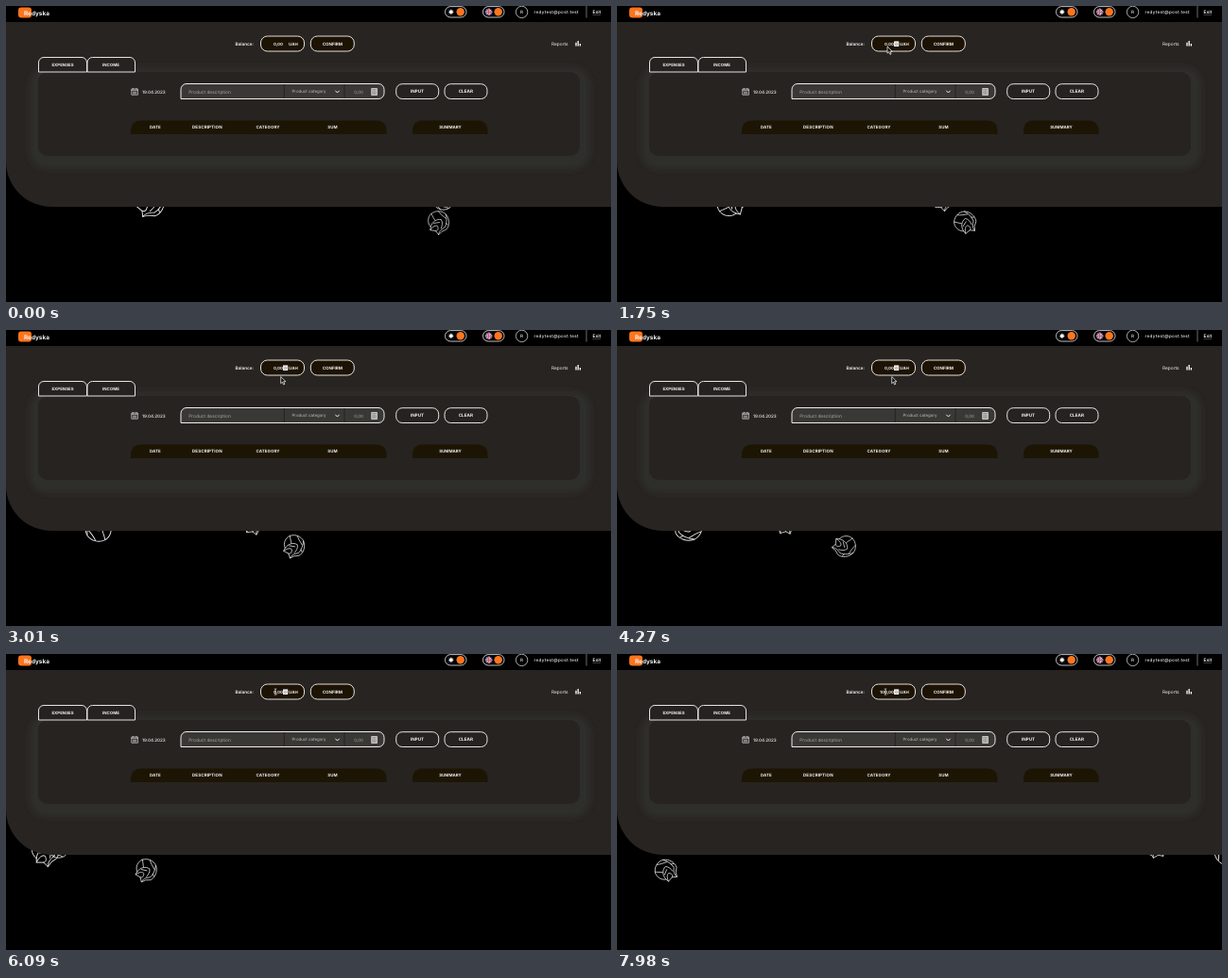
These frames come from a looping animation (640 px wide and 314 px high, 8 s). An HTML page:

```html
<!DOCTYPE html>
<html lang="en">
<head>
<meta charset="utf-8">
<title>Budget tracker</title>
<style>
  html, body { margin: 0; height: 100%; overflow: hidden; background: #000; }
  svg { display: block; width: 100vw; height: 100vh; }
  text { font: 500 4.6px Inter, sans-serif; fill: #f4f4f4; text-rendering: geometricPrecision; }
  .bold { font-weight: 700; font-size: 4.4px; }
  .button { font-weight: 700; font-size: 4.6px; }
  .mid { text-anchor: middle; }
  .end { text-anchor: end; }
  .hint { fill: #aaa8a3; font-weight: 400; }
  .line { fill: none; stroke: #eee; stroke-width: 1; }
  .pill { fill: #1c1304; stroke: #e4dfda; stroke-width: 1; }
  .plain { fill: #252220; stroke: #e4e4e4; stroke-width: 1; }
  .head { fill: #1d1504; }
  .orange { fill: #ff751d; }
  .roller { fill: none; stroke: #e8e8e8; stroke-width: .75; stroke-linejoin: round; stroke-linecap: round; }
</style>
</head>
<body>
<svg viewBox="0 0 640 314">
  <defs>
    <filter id="soft" x="-10%" y="-30%" width="120%" height="160%"><feGaussianBlur stdDeviation="3"/></filter>
    <g id="cabbage">
      <path d="M-13.5 0L-9.5-3L-8.5-9L-5-8.5C-1-12.5 6-12 9.5-8C13.5-3 13 4 9 8C4 12.5-4 12.5-8 8.5L-10 4Z"/>
      <path d="M-13.5 0C-9 1-7 4-5.5 7C-1 9.5 5 9 9 8M-8.5-9C-4-6-3-3-4-1C-7 0-9 0-9.5-3M-5-8.5C1-7 4-2 3 3C0 5-4 4-6.5 3M9.5-8C6-6 4-5 2.5-4M12 0C9 2 7 5 4.5 8M-1-5L0 1M-3 10.5L-1 8.5"/>
    </g>
  </defs>
  <rect width="640" height="314"/>

  <g id="rollers"></g>

  <!-- page panel -->
  <path d="M0 16H640V213H48A48 48 0 0 1 0 165Z" fill="#282422"/>
  <rect x="25" y="65" width="593" height="108" rx="18" fill="#2d2e2b" filter="url(#soft)"/>
  <rect x="34" y="70" width="573" height="89" rx="10" fill="#272321"/>

  <!-- header -->
  <rect width="640" height="17"/>
  <rect class="orange" x="13" y="1.5" width="14" height="11" rx="3"/>
  <text x="19" y="9.6" style="font-size:6.4px;font-weight:700">Redyska</text>
  <g id="toggles"></g>
  <g stroke="#fff" stroke-width=".8"><circle cx="470.8" cy="6.3" r="1.6" fill="#fff"/>
    <path d="M470.8 3.3v6M467.8 6.3h6M468.7 4.2l4.2 4.2M472.9 4.2l-4.2 4.2" stroke-width=".5"/></g>
  <circle cx="510.7" cy="6.3" r="3.6" fill="#39407e"/>
  <path d="M508.2 3.8l5 5M513.2 3.8l-5 5" stroke="#fff" stroke-width=".7"/>
  <path d="M507.1 6.3h7.2M510.7 2.7v7.2" stroke="#fff" stroke-width="1.8"/>
  <path d="M507.1 6.3h7.2M510.7 2.7v7.2" stroke="#d8384a" stroke-width="1"/>
  <circle class="line" cx="545.6" cy="6.4" r="6.2" style="stroke-width:.7"/>
  <text class="mid" x="545.6" y="8">R</text>
  <text x="558.5" y="8" style="font-size:4.5px;letter-spacing:.35px">redytest@post.test</text>
  <path d="M614 0V12.5" stroke="#888" stroke-width=".8"/>
  <text x="620.5" y="8" style="font-size:4.8px;font-weight:600">Exit</text>
  <path d="M620.5 9.4h8.6" stroke="#aaa" stroke-width=".4"/>

  <!-- balance row -->
  <text x="242.5" y="41.5" style="font-size:4.7px;font-weight:600">Balance:</text>
  <rect class="pill" x="269.5" y="32" width="46" height="16" rx="7"/>
  <rect class="pill" x="322.3" y="32" width="46" height="16" rx="7"/>
  <text class="bold mid" x="345.3" y="41.6" style="font-size:4.5px">CONFIRM</text>
  <text class="bold end" id="amount" x="293" y="41.6">0,00</text>
  <text class="bold" x="299" y="41.6">UAH</text>
  <g id="selection"><rect x="293" y="37.4" width="5.2" height="5.6" fill="#eee"/>
    <text class="mid" x="295.6" y="41.6" style="fill:#555;font-size:4px">0</text></g>
  <text x="577" y="41.7" style="font-size:4.8px;font-weight:400">Reports</text>
  <path d="M603 38.8V42.6M605.2 37V42.6M607.4 40V42.6" stroke="#fff" stroke-width="1.3"/>

  <!-- tabs -->
  <path class="plain" d="M34.5 70V60a5.5 5.5 0 0 1 5.5-5.5H80a5.5 5.5 0 0 1 5.5 5.5V70Z"/>
  <path class="plain" d="M86 70V60a5.5 5.5 0 0 1 5.5-5.5H131a5.5 5.5 0 0 1 5.5 5.5V70Z"/>
  <text class="bold mid" x="60" y="64">EXPENSES</text>
  <text class="bold mid" x="111" y="64">INCOME</text>

  <!-- entry form -->
  <path d="M132.8 88h6.6v6.2h-6.6zM132.8 89.3h6.6M134.3 87v1.5M138 87v1.5M134 91.2h4.2M134 92.8h4.2" fill="none" stroke="#ccc" stroke-width=".8"/>
  <text x="144" y="92.6">19.04.2023</text>
  <path d="M185 98.5V88.5a6 6 0 0 1 6-6H394a6 6 0 0 1 6 6V92.5a6 6 0 0 1-6 6Z" fill="#3a3835" stroke="#eee"/>
  <path d="M294.3 83V98M358 83V98" stroke="#24201e" stroke-width=".9"/>
  <text class="hint" x="193.3" y="92.5" style="font-size:4.8px">Product description</text>
  <text class="hint" x="302.5" y="92.4" style="font-size:4.4px;fill:#c4c2be">Product category</text>
  <path class="line" d="M348.4 89.8l2.1 2.2 2.1-2.2"/>
  <text class="hint" x="368.3" y="92.5" style="font-size:4.5px">0,00</text>
  <rect x="386.2" y="87" width="6.8" height="8" rx=".8" fill="#c9c7c3"/>
  <path d="M387.5 88.8h4.2M387.5 91h4.2M387.5 93h4.2" stroke="#3a3835" stroke-width=".8" stroke-dasharray="1 .6"/>
  <rect class="plain" x="412.7" y="82.7" width="45" height="15.8" rx="6.5"/>
  <rect class="plain" x="464" y="82.7" width="45" height="15.8" rx="6.5"/>
  <text class="button mid" x="435" y="92.4">INPUT</text>
  <text class="button mid" x="486.3" y="92.4">CLEAR</text>

  <!-- table heads -->
  <path class="head" d="M132 136V131a9.5 9.5 0 0 1 9.5-9.5H393a9.5 9.5 0 0 1 9.5 9.5V136Z"/>
  <path class="head" d="M430 136V131a9.5 9.5 0 0 1 9.5-9.5H500a9.5 9.5 0 0 1 9.5 9.5V136Z"/>
  <g letter-spacing=".1">
    <text class="bold" x="152" y="130.3">DATE</text>
    <text class="bold" x="197" y="130.3" style="font-size:4.5px">DESCRIPTION</text>
    <text class="bold" x="264.5" y="130.3">CATEGORY</text>
    <text class="bold" x="340.3" y="130.3">SUM</text>
  </g>
  <text class="bold mid" x="470" y="130.3">SUMMARY</text>

  <!-- pointers share one position -->
  <path id="arrow" d="M0 0V7.2L1.7 5.7L2.9 8.4L4.1 7.9L2.9 5.2H5.2Z" fill="#111" stroke="#fff" stroke-width=".7"/>
  <path id="beam" d="M-1.2-3.2Q0-3.2 0-2.3Q0-3.2 1.2-3.2M0-2.3V2.5M-1.2 3.3Q0 3.3 0 2.5Q0 3.3 1.2 3.3" fill="none" stroke="#eee" stroke-width=".7"/>
</svg>
<script>
const LOOP = 8000, STEP = 70;
const byId = id => document.getElementById(id);
const show = (id, on) => byId(id).setAttribute('visibility', on ? 'visible' : 'hidden');

byId('toggles').innerHTML = [464.5, 504.5].map(x =>
  `<rect class="line" x="${x}" y=".6" width="22.5" height="11.4" rx="5.7" style="stroke-width:.8"/>
   <circle class="orange" cx="${x + 16.2}" cy="6.3" r="4.2"/>`).join('');

// x and y at the start, radius, speed in px/ms, starting angle
const rollers = [
  { x: 457.5, y: 229.5, r: 12.5, speed: .0508, angle: 270 },
  { x: 462, y: 204, r: 13, speed: .0668, angle: 60 },
  { x: 153, y: 209, r: 16, speed: .0183, angle: -60 },
];
byId('rollers').innerHTML = rollers.map(() => '<use class="roller" href="#cabbage"/>').join('');
const rollerNodes = [...byId('rollers').children];

const pointerPath = [
  [900, 300, 40], [1300, 286, 43], [1900, 286, 43], [2500, 290.7, 49.5],
  [4500, 290.7, 49.5], [5000, 287, 40], [5600, 287, 40], [6500, 283.5, 40], [8000, 284, 40],
];

function pointerAt(t) {
  const i = Math.max(1, pointerPath.findIndex(p => p[0] >= t));
  const [t0, x0, y0] = pointerPath[i - 1], [t1, x1, y1] = pointerPath[i];
  const k = Math.max(0, (t - t0) / (t1 - t0)), s = k * k * (3 - 2 * k);
  return [x0 + (x1 - x0) * s, y0 + (y1 - y0) * s];
}

function amountAt(t) {
  if (t < 7140) return '0,00';
  if (t < 7420) return '1,00';
  return t < 7700 ? '10,00' : '100,00';
}

function draw(t) {
  rollers.forEach(({ x, y, r, speed, angle }, i) => {
    let cx = x - speed * t;
    if (cx < r) cx += 640;
    const turn = angle - speed * t / r * 180 / Math.PI;
    rollerNodes[i].setAttribute('transform',
      `translate(${cx} ${y}) rotate(${turn}) scale(${r / 13})`);
  });
  const place = `translate(${pointerAt(t).join(' ')})`;
  byId('arrow').setAttribute('transform', place);
  byId('beam').setAttribute('transform', place);
  show('arrow', t >= 900 && t < 4760);
  show('beam', t >= 4760);
  show('selection', t >= 1300);
  byId('amount').textContent = amountAt(t);
}

function tick() {
  const t = performance.now() % LOOP;
  draw(Math.floor(t / STEP) * STEP);
  requestAnimationFrame(tick);
}
tick();
</script>
</body>
</html>
```
